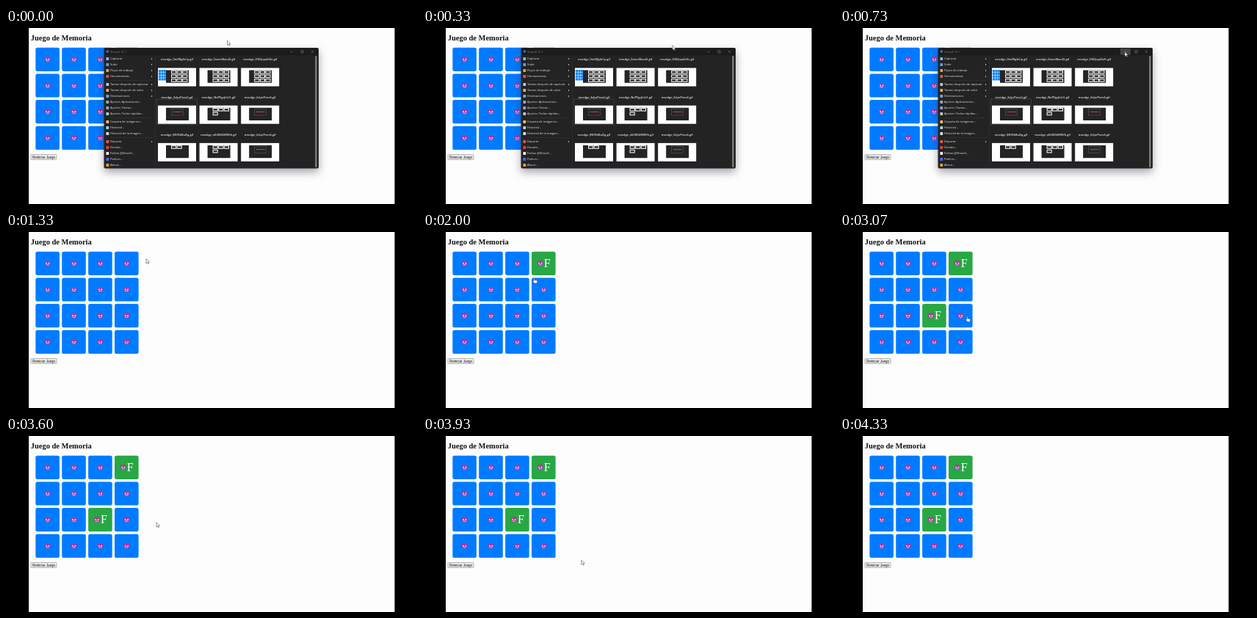
An HTML page that plays this animation: 560x240 px, repeating every 4390 ms.

```html
<!DOCTYPE html>
<html lang="es">
<head>
<meta charset="utf-8">
<title>Juego de Memoria</title>
<style>
html, body { margin: 0; width: 100%; height: 100%; overflow: hidden; background: #000; }
svg { display: block; width: 560px; height: 240px; }
text { white-space: pre; }
.serif { font-family: "Liberation Serif", "Times New Roman", serif; }
.ui { font-family: "Open Sans", "Noto Sans", sans-serif; fill: #e4e4e4; }
.button { font: 4.5px "Liberation Sans", Arial, sans-serif; }
#win { filter: drop-shadow(0 5px 6px rgba(40, 40, 60, .42)); transform-origin: 280px 240px; }
</style>
</head>
<body>
<svg id="stage" viewBox="0 0 560 240" width="560" height="240"></svg>
<script>
const NS = 'http://www.w3.org/2000/svg';
const LOOP = 4390, STEP = 200 / 3;
const stage = document.getElementById('stage');

function add(parent, tag, attrs = {}, text) {
  const el = document.createElementNS(NS, tag);
  for (const k in attrs) el.setAttribute(k, attrs[k]);
  if (text) el.textContent = text;
  return parent.appendChild(el);
}
const rect = (p, x, y, width, height, fill, more) =>
  add(p, 'rect', { x, y, width, height, fill, ...more });
const show = (el, on) => el.setAttribute('visibility', on ? 'visible' : 'hidden');

// Page
rect(stage, 31, 0, 498.5, 240, '#fdfdfd');
add(stage, 'text', { x: 33.8, y: 17, class: 'serif', 'font-size': 10.45, 'font-weight': 700, fill: '#111' }, 'Juego de Memoria');
rect(stage, 34, 172.6, 35, 6.8, '#efefef', { rx: .8, stroke: '#858585', 'stroke-width': .6 });
add(stage, 'text', { x: 51.5, y: 177.6, class: 'button', 'text-anchor': 'middle', fill: '#111' }, 'Reiniciar Juego');

// Cards
function drawMask(p) {
  const g = add(p, 'g');
  rect(g, -3.6, -3.4, 7.2, 3.2, '#c93080', { rx: 1.4 });
  rect(g, -4, -1.2, 8, 2.8, '#8a35c0', { rx: 1 });
  rect(g, -3, 1, 6, 2.5, '#a5409f', { rx: 1 });
  rect(g, -2.7, -.9, 2, 1.7, '#f6d5ee', { rx: .5 });
  rect(g, .7, -.9, 2, 1.7, '#f6d5ee', { rx: .5 });
  rect(g, -2, 1.7, 4, .8, '#d8e4ff');
  return g;
}

const cards = [];
for (let i = 0; i < 16; i++) {
  const x = 40.3 + i % 4 * 35.9, y = 26.7 + Math.floor(i / 4) * 35.7;
  const g = add(stage, 'g', { transform: `translate(${x} ${y})` });
  const face = rect(g, 0, 0, 32.6, 32.2, '#007bff', { rx: 2.6 });
  const mask = drawMask(g);
  const letter = add(g, 'text', { x: 16.8, y: 21.4, class: 'serif', 'font-size': 16, fill: '#fff' }, 'F');
  cards.push({ face, mask, letter });
}

function flip(card, open) {
  card.face.setAttribute('fill', open ? '#28a745' : '#007bff');
  card.mask.setAttribute('transform', `translate(${open ? 11.8 : 16.4} 16)`);
  show(card.letter, open);
}
cards.forEach(c => flip(c, false));

// Capture window
const win = add(stage, 'g', { id: 'win' });
rect(win, 133.5, 27, 292.5, 164.5, '#232323', { rx: 2 });
rect(win, 134, 27.2, 291.5, 10, '#1c1c1c', { rx: 2 });
add(win, 'circle', { cx: 138.3, cy: 32, r: 1.8, fill: '#3a78c8' });
add(win, 'text', { x: 142, y: 33.5, class: 'ui', 'font-size': 4, opacity: .5 }, 'ShareX 16.1');
const hover = rect(win, 382, 28, 14, 8.5, '#444');
add(win, 'path', { d: 'M387.5 32.3h3M402 30.8h3v3h-3zM416 30.8l3 3m0-3l-3 3', stroke: '#999', 'stroke-width': .5, fill: 'none' });

const menu = [
  ['Capturar', 42, '#8fb3d9', 1], ['Subir', 50, '#5f9fe0', 1],
  ['Flujos de trabajo', 58, '#e0a13c', 1], ['Herramientas', 66, '#d8574f', 1],
  ['Tareas después de capturar', 77, '#b9c6d3', 1], ['Tareas después de subir', 85, '#d8b45a', 1],
  ['Destinaciones', 93, '#6fa8dc', 1], ['Ajustes: Aplicaciones...', 101, '#9aa7b5'],
  ['Ajustes: Tareas...', 109, '#9aa7b5'], ['Ajustes: Teclas rápidas...', 117, '#c4c4c4'],
  ['Carpeta de imágenes...', 128, '#e6c15c'], ['Historial...', 136, '#b8c9da'],
  ['Historial de la imagen...', 144, '#d5dde4'], ['Depurar', 155, '#e05a48', 1],
  ['Donate...', 163, '#e2413c'], ['Follow @ShareX...', 171, '#f0f0f0'],
  ['Parlero...', 179, '#5865f2'], ['About...', 187, '#e2a63b']
];
for (const [label, y, color, sub] of menu) {
  rect(win, 136.4, y - 1.9, 3.8, 3.8, color, { rx: .7 });
  add(win, 'text', { x: 142, y: y + 1.4, class: 'ui', 'font-size': 4.05 }, label);
  if (sub) add(win, 'path', { d: `M198 ${y - 1.2}l1.3 1.2l-1.3 1.2z`, fill: '#ddd' });
}
for (const y of [71.5, 122.5, 149.5]) rect(win, 142, y, 57, .4, '#444');
rect(win, 203, 38, .5, 152, '#363636');
rect(win, 205.6, 97, 54.8, 34.8, 'none', { stroke: '#4d4d4d', 'stroke-width': .6 });

// File name and number of outlined tiles in each preview
const files = [
  ['0mXRgfnCp', 9], ['0aem0bzuZt', 9], ['O8QnpaZs8c', 9],
  ['2sIprPnex6', 0], ['NoP5gqCsL5', 4], ['2sIprPnex6', 0],
  ['0N9SkBuZig', 2], ['oEtWXkWWVh', 4], ['2sIprPnex6', 0]
];
files.forEach(([name, tiles], i) => {
  const x = 207 + i % 3 * 56.6, y = 54.5 + Math.floor(i / 3) * 51.2;
  add(win, 'text', { x: x + 26, y: y - 10.2, class: 'ui', 'font-size': 3.9, 'font-weight': 600, 'text-anchor': 'middle' }, `msedge_${name}.gif`);
  rect(win, x, y, 52, 25, '#fff');
  if (i === 0) {
    for (let k = 0; k < 12; k++)
      rect(win, x + .8 + k % 3 * 3.6, y + 2.6 + Math.floor(k / 3) * 3.7, 3.3, 3.3, '#1687f5', { rx: .3 });
  }
  rect(win, x + 11, y + 3, 31, 17.3, '#242424', { rx: .4 });
  if (!tiles) {
    rect(win, x + 18.5, y + 4.8, 16, 8.5, 'none', { stroke: '#666', 'stroke-width': .5 });
    rect(win, x + 20.5, y + 8, 12, 1.4, '#8a4a48', { 'stroke-dasharray': '1 1' });
  }
  for (let k = 0; k < tiles; k++) {
    rect(win, x + 18.5 + k % 3 * 7.6, y + 3.8 + Math.floor(k / 3) * 5.6, 6.2, 3.6, '#333', { stroke: '#fff', 'stroke-width': 1 });
  }
});
rect(win, 421.4, 38, 2, 152, '#8c8c86', { rx: 1 });

// Pointers, with the tip at the local origin
const arrow = add(stage, 'path', {
  d: 'M0 0V6.2L1.5 4.9L2.5 7.1L3.5 6.6L2.5 4.5H4.5Z',
  fill: '#fff', stroke: '#333', 'stroke-width': .5
});
const hand = add(stage, 'path', {
  d: 'M0 .6Q.6-.3 1.2 .6V3L4 3.5Q5 3.8 4.8 5L4.2 7.4H.8L-1.6 4.5Q-1.6 3.5-.7 3.8L0 4.5Z',
  fill: '#fff', stroke: '#333', 'stroke-width': .5
});

// time, x, y
const path = [
  [0, 301.5, 17], [130, 308, 18], [600, 388, 32.5], [870, 388, 32.5],
  [1330, 191, 36.5], [1600, 164, 44], [1800, 163, 45], [2000, 151, 62.5],
  [2400, 124.5, 110.5], [2800, 124.5, 110.5], [3270, 205, 118],
  [3730, 205, 118], [4200, 232, 246], [4390, 232, 246]
];
const ease = u => u * u * (3 - 2 * u);

function pointerAt(t) {
  const i = Math.max(1, path.findIndex(p => p[0] > t));
  const [t0, x0, y0] = path[i - 1], [t1, x1, y1] = path[i];
  const u = ease((t - t0) / (t1 - t0));
  return [x0 + (x1 - x0) * u, y0 + (y1 - y0) * u];
}

function overCard(x, y) {
  const u = x - 40.3, v = y - 26.7;
  return u > 0 && v > 0 && u < 140.4 && v < 139.4 && u % 35.9 < 32.6 && v % 35.7 < 32.2;
}

function draw(now) {
  const t = Math.floor((now % LOOP + 4) / STEP) * STEP;
  const [x, y] = pointerAt(t);
  const pointing = t > 1000 && overCard(x, y);
  for (const p of [arrow, hand]) p.setAttribute('transform', `translate(${x} ${y})`);
  show(arrow, !pointing);
  show(hand, pointing);
  show(hover, x > 382 && y > 28);

  // The window shrinks towards the task bar when minimised
  const away = Math.min(1, Math.max(0, (t - 800) / 200));
  show(win, away < 1);
  show(hover, away < 1 && x > 382 && y > 28);
  win.style.opacity = 1 - away;
  win.style.transform = `scale(${1 - .3 * away * away})`;

  flip(cards[3], t >= 1730);
  flip(cards[10], t >= 2660);
}

function tick() {
  draw(performance.now());
  requestAnimationFrame(tick);
}
tick();
</script>
</body>
</html>
```
